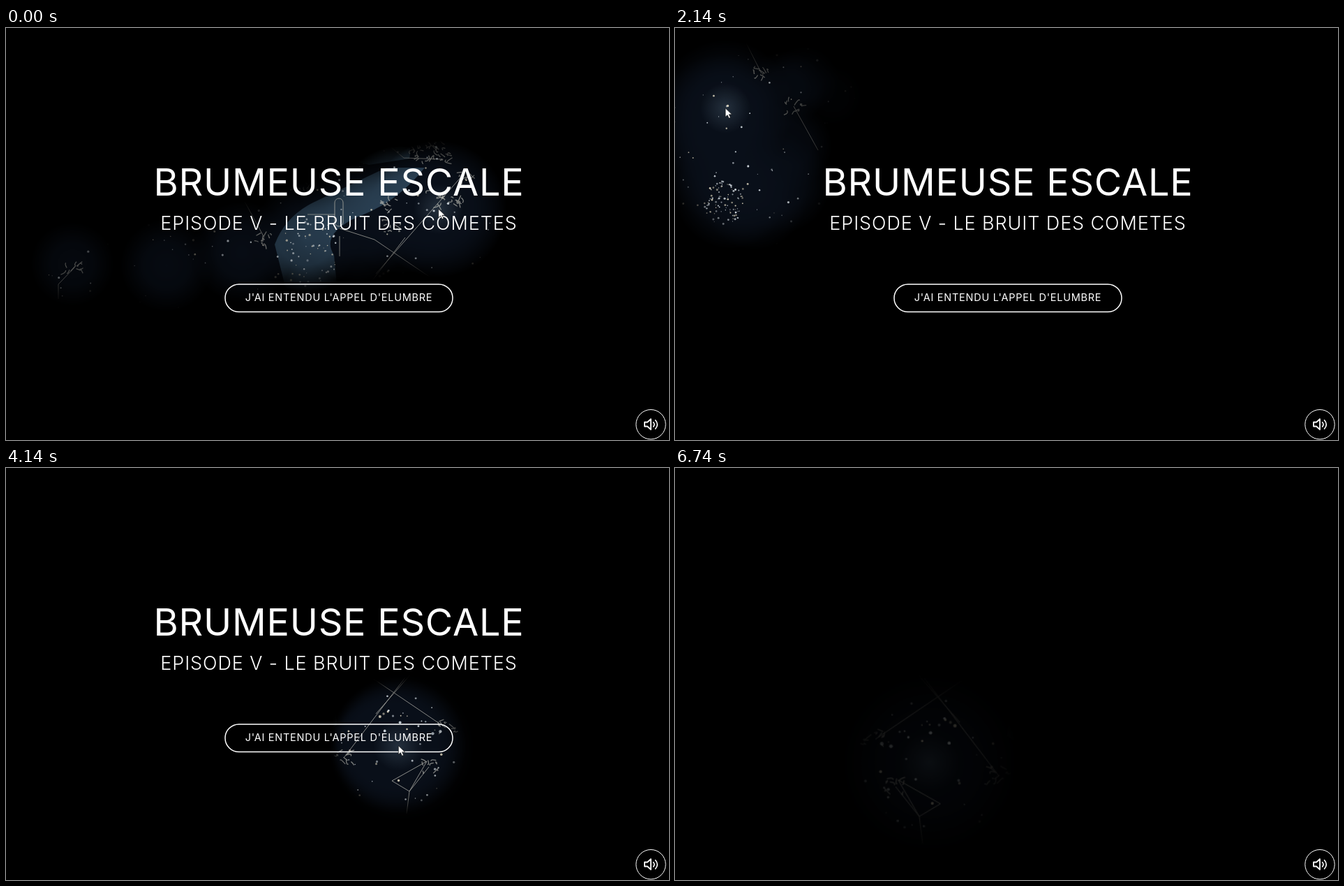
Recreate the animation shown at these times as an HTML page. Size 950 px wide and 590 px high, loop 6780 ms.

```html
<!DOCTYPE html>
<html lang="fr">
<head>
<meta charset="utf-8">
<title>Ciel</title>
<style>
  html, body { margin: 0; width: 100%; height: 100%; overflow: hidden; background: #000; }
  #stage { position: relative; width: 950px; height: 590px; overflow: hidden; perspective: 1000px; background: #000; }
  svg { position: absolute; left: 0; top: 0; overflow: visible; }
  text { font-family: Inter, Lato, sans-serif; fill: #fff; text-anchor: middle; }
  .label { font-family: "Noto Serif", serif; fill: #a9adb2; }
</style>
</head>
<body>
<div id="stage">
  <svg id="scene" width="950" height="590" viewBox="0 0 950 590">
    <defs>
      <radialGradient id="soft">
        <stop offset="0" stop-color="#fff"/>
        <stop offset=".5" stop-color="#fff" stop-opacity=".8"/>
        <stop offset=".8" stop-color="#fff" stop-opacity=".3"/>
        <stop offset="1" stop-color="#fff" stop-opacity="0"/>
      </radialGradient>
      <radialGradient id="halo">
        <stop offset="0" stop-color="#3a4a5a" stop-opacity=".55"/>
        <stop offset="1" stop-color="#3a4a5a" stop-opacity="0"/>
      </radialGradient>
      <mask id="reveal" maskUnits="userSpaceOnUse" x="0" y="0" width="950" height="590">
        <g id="trail"></g>
      </mask>
    </defs>
    <g mask="url(#reveal)">
      <rect width="950" height="590" fill="#090f19"/>
      <g fill="#2a4053">
        <path d="M455 28Q530 30 550 110Q585 160 578 187L520 196Q480 190 505 150Q520 110 490 90Z"/>
        <path d="M385 310Q400 270 440 250L545 200H600Q560 250 505 270Q450 295 470 325L474 368Q430 400 400 370Z"/>
      </g>
      <circle id="glow" r="36" fill="url(#halo)"/>
      <g id="figures" fill="none" stroke="#c9c8bf" opacity=".8">
        <rect x="471" y="244" width="12" height="40" rx="6"/>
        <path d="M470 95L488 105L472 117Z" stroke-width="2"/>
      </g>
      <g id="stars"></g>
      <text class="label" x="407" y="101" font-size="9">Brume</text>
      <text class="label" x="478" y="90" font-size="11">W</text>
    </g>
    <g id="titles">
      <text x="477" y="239.5" font-size="54" letter-spacing=".75">BRUMEUSE ESCALE</text>
      <text x="477" y="289" font-size="27" font-weight="300" letter-spacing=".9">EPISODE V - LE BRUIT DES COMETES</text>
    </g>
    <g id="button">
      <rect id="pill" x="314" y="367" width="326" height="39.5" rx="19.75" fill="#fff" stroke="#fff" stroke-width="1.5"/>
      <text id="caption" x="477" y="391" font-size="14.5" letter-spacing=".75">J'AI ENTENDU L'APPEL D'ELUMBRE</text>
    </g>
  </svg>
  <svg width="950" height="590" viewBox="0 0 950 590">
    <g fill="none" stroke="#fff">
      <circle cx="924" cy="567.7" r="21.2" fill="#000"/>
      <path d="M915 564.5h4l5-4.500v15l-5-4.500h-4z" stroke-width="1.8" stroke-linejoin="round"/>
      <path d="M927.500 564.500q3 3.200 0 6.500M930.500 561.500q5.500 6.200 0 12.500" stroke-width="1.6" stroke-linecap="round"/>
    </g>
    <path id="cursor" d="M0 0V12.500L3 9.800L5.200 14.500L7.300 13.500L5.200 9H9.300Z" fill="#fff" stroke="#000" stroke-width=".6"/>
  </svg>
</div>
<script>
const LOOP = 6780, CLICK = 4200, LEAVE = 4240, STEP = 70, LIFE = 650;
const $ = id => document.getElementById(id);
const clamp = v => Math.max(0, Math.min(1, v));
const ramp = (t, from, to) => clamp((t - from) / (to - from));

function set(node, attrs) {
  for (const name in attrs) node.setAttribute(name, attrs[name]);
  return node;
}
function add(parent, tag, attrs) {
  return set(parent.appendChild(document.createElementNS("http://www.w3.org/2000/svg", tag)), attrs);
}

let seed = 17;
function random() {
  seed = (seed * 16807) % 2147483647;
  return seed / 2147483647;
}
const between = (a, b) => a + (b - a) * random();

// Sky map: a few constellations, each ending in a tangle of engraved strokes
function tangle(x, y) {
  let d = "";
  for (let i = 0; i < 10; i++) {
    d += `M${x + between(-13, 13)} ${y + between(-10, 10)}q${between(-5, 5)} ${between(-5, 5)} ${between(-8, 8)} ${between(-8, 8)}`;
  }
  add($("figures"), "path", { d, "stroke-width": 1.3, opacity: .8 });
}

const constellations = `
  M453 40L495 60L430 200 M495 60L517 142L570 186L625 188 M495 60L617 175
  M478 120V178 M478 298V327 M471 267H432
  M478 287L528 303L630 372 M530 352L655 210 M572 300L484 415
  M574 495L578 463L553 448L603 420L578 463L606 428
  M92 2L124 65 M205 175L170 112 M290 118L325 160 M340 245L370 300 M75 388V367L98 343`;
for (const d of constellations.match(/M[^M]+/g)) {
  const line = add($("figures"), "path", { d: d.trim(), opacity: .85 });
  const end = line.getPointAtLength(line.getTotalLength());
  if (line.getTotalLength() > 50) tangle(end.x, end.y);
}
for (let i = 0; i < 16; i++) tangle(between(100, 780), between(60, 320));

function scatter(x, y, rx, ry, count, size) {
  for (let i = 0; i < count; i++) {
    const angle = between(0, 2 * Math.PI), reach = Math.sqrt(random());
    add($("stars"), "circle", {
      cx: x + rx * reach * Math.cos(angle), cy: y + ry * reach * Math.sin(angle),
      r: between(.5, size), fill: random() < .3 ? "#e8dfc6" : "#e4ecf2", opacity: between(.45, .95)
    });
  }
}
scatter(475, 270, 560, 330, 650, 1.7);
scatter(435, 320, 40, 55, 50, 1.7);
scatter(70, 250, 28, 32, 100, 1.5);
scatter(566, 400, 65, 55, 14, 2.2);

// Pointer: [time, x, y], joined by smooth curves
const path = [
  [-420, 95, 338], [-350, 230, 340], [-210, 430, 300], [0, 619, 259], [300, 790, 390], [650, 850, 330],
  [930, 735, 160], [1140, 570, 110], [1370, 351, 159], [1650, 165, 75], [1800, 160, 215], [1960, 80, 235],
  [2140, 72, 115], [2700, 210, 110], [3130, 320, 210], [3370, 476, 361], [CLICK, 566, 399],
  [4770, 566, 399], [5540, 455, 215], [6100, 470, -30]
];
function pointer(t) {
  let i = 0;
  while (i < path.length - 2 && t >= path[i + 1][0]) i++;
  const a = path[i], b = path[i + 1], span = b[0] - a[0];
  const u = clamp((t - a[0]) / span), v = 1 - u;
  const slope = (k, axis) => {
    const p = path[Math.max(0, k - 1)], n = path[Math.min(path.length - 1, k + 1)];
    return (n[axis] - p[axis]) / (n[0] - p[0]);
  };
  return [1, 2].map(axis =>
    a[axis] * v * v * (1 + 2 * u) + b[axis] * u * u * (3 - 2 * u)
    + span * u * v * (slope(i, axis) * v - slope(i + 1, axis) * u));
}

const blobs = Array.from({ length: Math.ceil(LIFE / STEP) + 2 }, () => add($("trail"), "circle", { fill: "url(#soft)" }));
const spot = add($("trail"), "circle", { cx: 566, cy: 400, r: 106, fill: "url(#soft)" });

function drawTrail(t, u) {
  const head = Math.min(t, CLICK), last = Math.floor(head / STEP) * STEP;
  blobs.forEach((blob, i) => {
    const time = i ? last - (i - 1) * STEP : head;
    const age = t - time, [cx, cy] = pointer(time);
    const opacity = time < path[0][0] ? 0 : clamp(1 - (age / LIFE) ** 2);
    set(blob, { cx, cy, r: Math.max(30, 98 - .09 * age), opacity });
  });
  set(spot, { opacity: ramp(t, 3900, CLICK) * (.62 - .36 * u ** 3) });
}

function draw(t) {
  const u = Math.max(0, t - LEAVE) / (LOOP - LEAVE);
  const [x, y] = pointer(t), [cx, cy] = pointer(Math.min(t, CLICK));
  set($("cursor"), { transform: `translate(${x} ${y})` });
  set($("glow"), { cx, cy });
  drawTrail(t, u);

  // The whole sky turns to show its back, while the texts fly apart
  $("scene").style.transform = u
    ? `translateX(${27 * Math.sin(Math.PI * u) ** 2}px) rotateY(${184 * u ** 1.75}deg) scale(${1 + .22 * u})`
    : "none";
  set($("titles"), { transform: `translate(0 ${-987 * u * u})`, opacity: clamp(1 - 2 * u * u) });
  set($("button"), {
    transform: `translate(477 ${387 + 3120 * u * u}) scale(${Math.max(.3, 1 - 1.1 * u)}) translate(-477 -387)`,
    opacity: 1 - ramp(t, 4770, 5020)
  });
  set($("pill"), { "fill-opacity": .27 * ramp(t, 4150, 4350), "stroke-opacity": 1 - .55 * ramp(t, LEAVE, 4700) });
  set($("caption"), { opacity: 1 - ramp(t, 4150, 4400) });
}

const start = performance.now();
function tick() {
  draw((performance.now() - start) % LOOP);
  requestAnimationFrame(tick);
}
tick();
</script>
</body>
</html>
```
